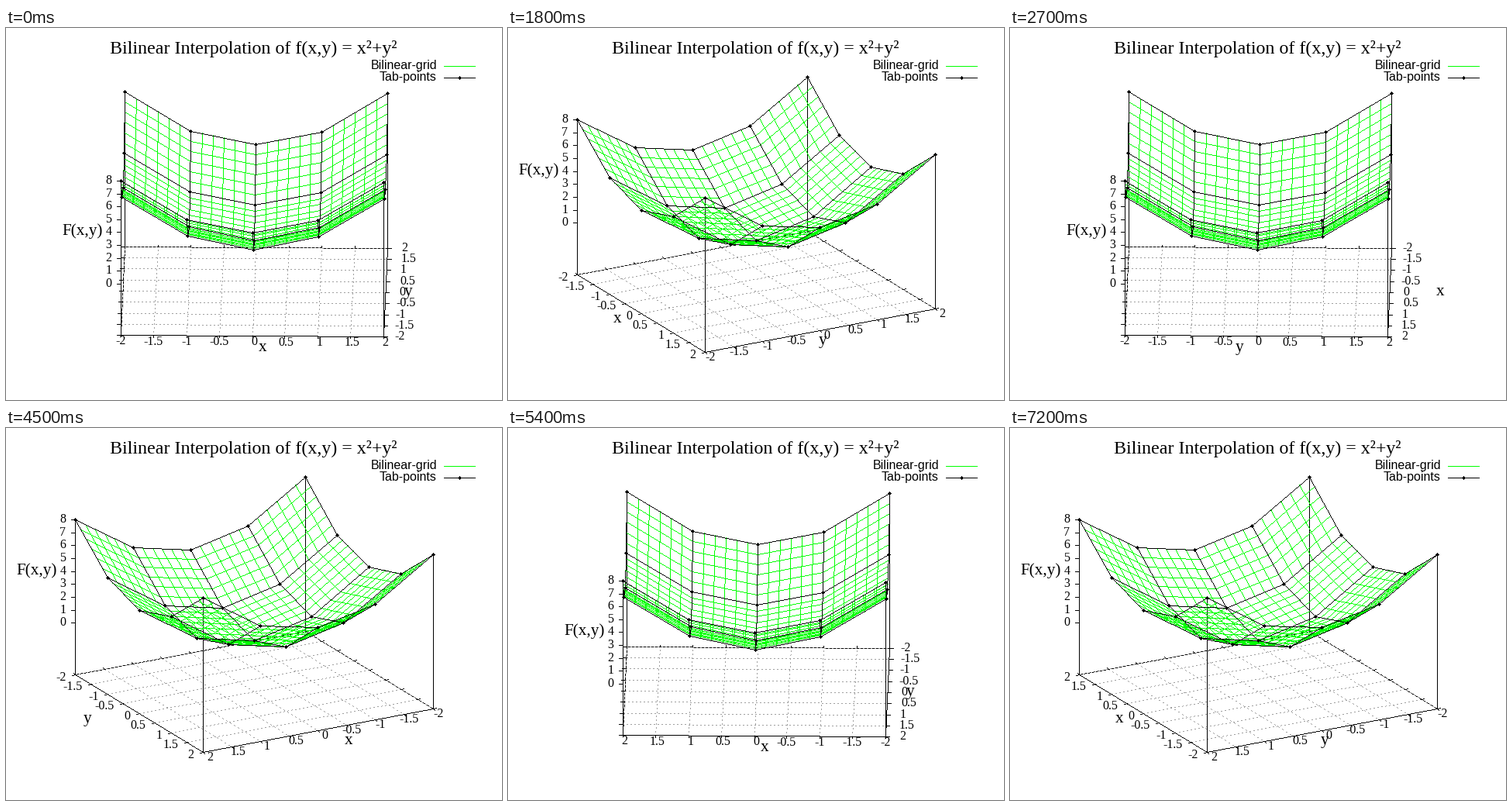
A matplotlib script for the animation above (8 s loop, 640 by 480 pixels).

```python
import numpy as np
import matplotlib.pyplot as plt
from matplotlib.animation import ArtistAnimation

W, H = 640, 480
BLACK, GREEN, GRAY = (0, 0, 0), (0, 255, 0), (160, 160, 160)
CX, CY = 320, 340.5              # centre of the base plane
SX, SY, SZ = 170.0, 57.4, 199.4  # half width, half depth, full height
KNOTS = np.arange(-2, 3)
TICKS = np.arange(-2, 2.1, 0.5)
TICK = 5
LEGEND = ((49, "Bilinear-grid", GREEN), (64, "Tab-points", BLACK))

fig = plt.figure(figsize=(W / 72, H / 72), dpi=72, facecolor="white")
ax = fig.add_axes([0, 0, 1, 1])
ax.set_xlim(0, W)
ax.set_ylim(H, 0)
ax.axis("off")


def text(x, y, s, size=16, ha="center", font="Liberation Serif"):
    return ax.text(x, y, s, fontsize=size, ha=ha, va="baseline",
                   family=font, color="black", zorder=2)


class Canvas:
    """Bitmap with hard one-pixel lines."""

    def __init__(self):
        self.px = np.full((H, W, 3), 255, np.uint8)

    def line(self, p, q, color=BLACK, dotted=False):
        p, q = np.round(p), np.round(q)
        n = int(np.abs(q - p).max())
        t = np.linspace(0, 1, n + 1)[:, None]
        pts = np.floor(p + (q - p) * t + 0.5).astype(int)
        if dotted:
            pts = pts[np.arange(n + 1) % 5 < 2]
        self.px[pts[:, 1], pts[:, 0]] = color

    def diamond(self, p, r=2):
        x, y = np.array(p, int)
        for d in range(-r, r + 1):
            w = r - abs(d)
            self.px[y + d, x - w:x + w + 1] = BLACK


def height(x, y):
    """Bilinear interpolation of x^2 + y^2 between integer knots."""
    return sum(np.interp(v, KNOTS, KNOTS ** 2) for v in (x, y))


class View:
    """Orthographic projection turned by an angle within one quadrant."""

    def __init__(self, deg):
        self.c, self.s = np.cos(np.radians(deg)), np.sin(np.radians(deg))
        # outward directions of the two labelled edges
        self.out_x = np.array([-self.s, self.c / 2])
        self.out_y = np.array([self.c, self.s / 2])

    def __call__(self, x, y, z=-4):
        dx = SX * (x * self.c + y * self.s) / 2
        dy = SY * (x * self.s - y * self.c) / 2 - SZ * (z + 4) / 12
        return np.array([CX + np.trunc(dx), np.floor(CY + dy)])

    def surface(self, x, y):
        return self(x, y, height(x, y))


def draw_base(cv, v):
    cv.line(v(-2, -2), v(-2, 2))
    cv.line(v(-2, 2), v(2, 2))
    for t in TICKS:
        cv.line(v(t, -2), v(t, 2), GRAY, dotted=True)
        cv.line(v(-2, t), v(2, t), GRAY, dotted=True)
    for t in TICKS:
        for p, d in ((v(t, -2), v.out_x), (v(t, 2), -v.out_x),
                     (v(2, t), v.out_y), (v(-2, t), -v.out_y)):
            cv.line(p, p + TICK * d)
    for z in range(9):
        p = v(-2, -2, z)
        cv.line(p, p - [TICK, 0])
    cv.line(v(-2, -2), v(2, -2))
    cv.line(v(2, -2), v(2, 2))
    for a in (-2, 2):
        for b in (-2, 2):
            cv.line(v(a, b), v(a, b, 8))


def draw_mesh(cv, v, values, color):
    for t in values:
        for a in KNOTS[:-1]:
            cv.line(v.surface(t, a), v.surface(t, a + 1), color)
            cv.line(v.surface(a, t), v.surface(a + 1, t), color)


def draw_picture(v):
    cv = Canvas()
    draw_base(cv, v)
    draw_mesh(cv, v, np.linspace(-2, 2, 25), GREEN)
    draw_mesh(cv, v, KNOTS, BLACK)
    for a in KNOTS:
        for b in KNOTS:
            cv.diamond(v.surface(a, b))
    for y, _, color in LEGEND:
        cv.line((565, y), (605, y), color)
    cv.diamond((585, LEGEND[1][0]))
    return ax.imshow(cv.px, extent=(0, W, H, 0), aspect="auto",
                     interpolation="nearest", zorder=1)


def tick_label(p, out, value):
    x, y = p + out * [13.5, 16] + [0.5, 4]
    pad = 4 if value >= 0 else 0     # blank in place of the minus sign
    s = f"{value:g}"
    if out[0] > 0.7:
        return text(x + pad, y, s, ha="left")
    if out[0] < -0.7:
        return text(x, y, s, ha="right")
    return text(x + pad / 2, y, s)


def axis_title(p, out, name):
    x, y = p + out * [52, 32] + [-3.5, 4]
    return text(x + (18 if name == "x" else -18), y, name, 21.3)


def draw_labels(v, quarter):
    names = "yx" if quarter == 1 else "xy"
    sign_x = -1 if quarter == 2 else 1
    sign_y = 1 if quarter == 0 else -1
    art = []
    for t in TICKS:
        art.append(tick_label(v(t, -2), v.out_x, sign_x * t + 0.0))
        art.append(tick_label(v(2, t), v.out_y, sign_y * t + 0.0))
    for z in range(9):
        x, y = v(-2, -2, z)
        art.append(text(x - 11.5, y + 4, str(z), ha="right"))
    art.append(axis_title(v(0, -2), v.out_x, names[0]))
    art.append(axis_title(v(2, 0), v.out_y, names[1]))
    x, y = v(-2, -2, 4)
    art.append(text(x - 49.5, y + 4.5, "F(x,y)", 21.3))
    return art


text(319.7, 33, "Bilinear Interpolation of f(x,y) = x²+y²", 24)
for y, name, _ in LEGEND:
    text(556, y + 4, name, ha="right", font="Liberation Sans")

views = [View(deg) for deg in (1, 31, 61)]
pictures = [draw_picture(v) for v in views]
steps = []
for i in range(9):
    quarter, turn = divmod(i, 3)
    steps.append([pictures[turn]] + draw_labels(views[turn], quarter))

ax.set_xlim(0, W)
ax.set_ylim(H, 0)
anim = ArtistAnimation(fig, [steps[i // 9] for i in range(80)],
                       interval=100, repeat=True, repeat_delay=0)
plt.show()
```
